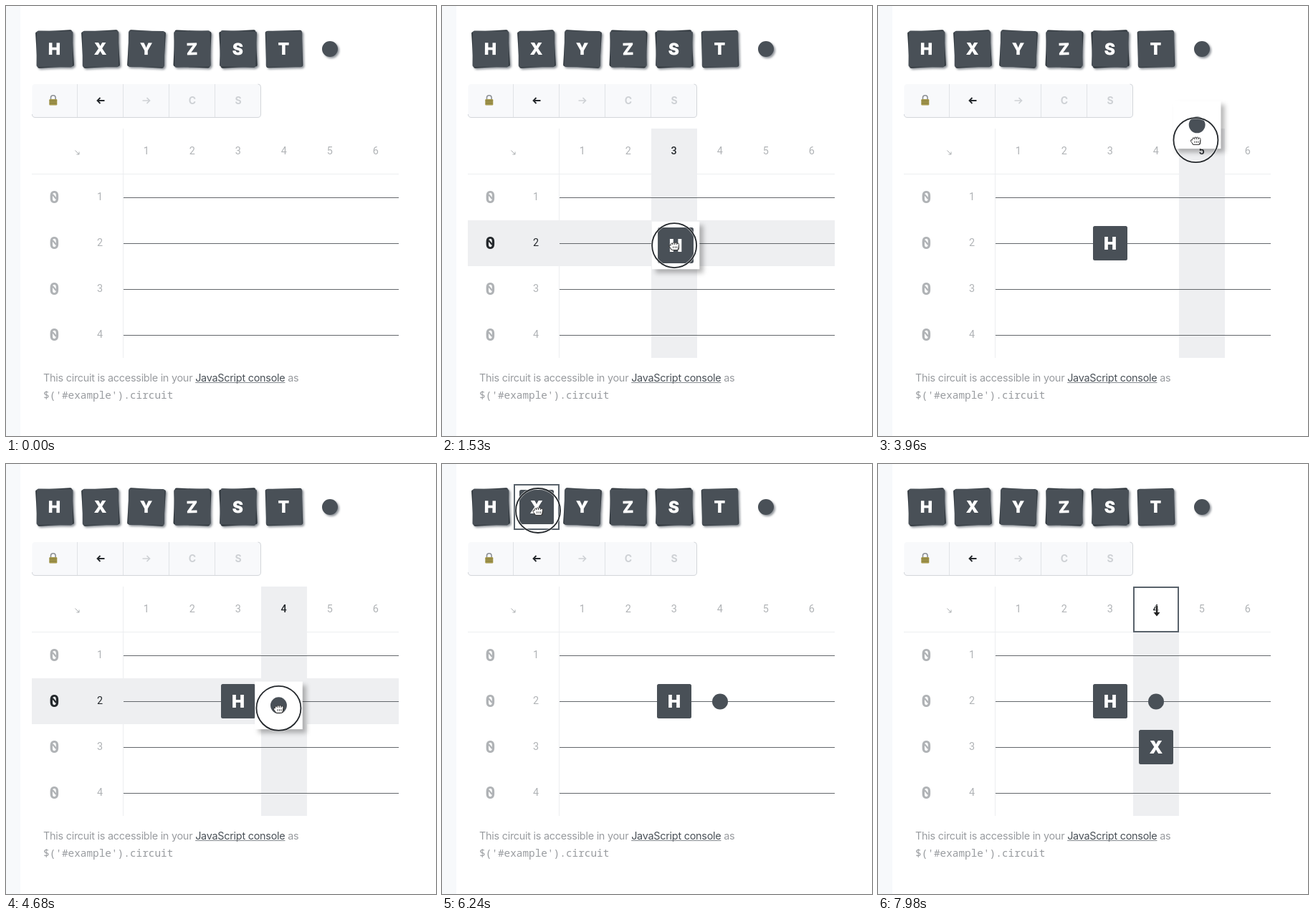
Animation, 600 px wide and 600 px high, one loop 8 s. Source, as an HTML page:

```html
<!DOCTYPE html>
<html lang="en">
<head>
<meta charset="utf-8">
<title>Circuit editor</title>
<style>
html, body { margin: 0; width: 100%; height: 100%; overflow: hidden; background: #fff; }
svg { display: block; width: 100vw; height: 100vh; }
text { font-family: Inter, sans-serif; }
.mid { text-anchor: middle; }
.num { font: 14.4px Roboto, sans-serif; text-anchor: middle; }
.bit { font: bold 24px Roboto, sans-serif; text-anchor: middle; }
.gate { font-weight: 900; fill: #fff; text-anchor: middle; }
.tool { font-size: 14px; font-weight: 700; fill: #ced1d5; text-anchor: middle; }
.note { font-size: 14.4px; letter-spacing: -.017em; fill: #989b9f; }
.mono { font: 14.4px "Noto Sans Mono", monospace; fill: #989b9f; }
.shade { filter: drop-shadow(2px 2px 1.5px rgba(50, 58, 70, .55)); }
.lift { filter: drop-shadow(5px 5px 3px rgba(0, 0, 0, .28)); }
</style>
</head>
<body>
<svg id="stage" viewBox="0 0 600 600"></svg>
<script>
const stage = document.getElementById('stage');
const LOOP = 8000, CELL = 64, LAG = 25;
const INK = '#495057', DARK = '#24282c', PALE = '#b0b3b6';
const colX = i => 164 + CELL * i;
const rowY = i => 235 + CELL * i;
const slotX = i => 68 + CELL * i;

// Letter, tilt of the front tile, tilt of the tile behind it; the last is the control dot
const stacks = [
  ['H', 0.5, -3.5], ['X', 0, -3.5], ['Y', 0.5, 3.5],
  ['Z', -1.5, 2.5], ['S', 2, -3], ['T', 0, -2], ['']
];

// Pointer path: time, x, y
const path = [
  [0, 190, -30], [100, 190, -30], [600, 66, 60], [840, 66, 60],
  [1110, 206, 229], [1500, 324, 334], [2460, 326, 335], [2580, 342, 269],
  [3100, 452, 64], [3780, 452, 64], [3960, 443.5, 186.5], [4080, 428, 250],
  [4350, 381, 340], [4900, 380, 341], [5600, 134, 65], [6400, 134, 65],
  [6510, 150, 100], [7000, 388, 402], [7340, 388, 402], [7860, 389, 205],
  [LOOP, 389, 205]
];

// Each gate is pressed, dragged from its slot and dropped in a cell
const moves = [
  { gate: 'H', slot: 0, press: 700, drag: 840, drop: 1800, col: 2, row: 1 },
  { gate: '', slot: 6, press: 3500, drag: 3780, drop: 4860, col: 3, row: 1 },
  { gate: 'X', slot: 1, press: 6050, drag: 6400, drop: 7200, col: 3, row: 2 }
];

const rect = (x, y, w, h, fill, more = '') =>
  `<rect x="${x}" y="${y}" width="${w}" height="${h}" fill="${fill}" ${more}/>`;
const line = (d, color, w = 1) =>
  `<path d="${d}" fill="none" stroke="${color}" stroke-width="${w}"/>`;
const label = (x, y, s, cls, more = '') =>
  `<text x="${x}" y="${y}" class="${cls}" ${more}>${s}</text>`;
const group = (id, body, more = '') => `<g id="${id}" ${more}>${body}</g>`;
const list = (n, fn) => Array.from({ length: n }, (_, i) => fn(i)).join('');
const block = (size, fill, turn = 0) =>
  rect(-size / 2, -size / 2, size, size, fill, `rx="2.5" transform="rotate(${turn})"`);

function gate(name) {
  return name
    ? block(48, INK) + label(0, 8.7, name, 'gate', 'font-size="24"')
    : `<circle r="11" fill="${INK}"/>`;
}

function stack([name, front, back], i) {
  const body = name
    ? block(51, '#2f363c', back) + block(50.5, INK, front) +
      label(-0.5, 8.2, name, 'gate', `font-size="23" transform="rotate(${front})"`)
    : gate('');
  return group('stack' + i, body, `class="shade" transform="translate(${slotX(i)} 60)"`);
}

function toolbar() {
  return rect(36.5, 109, 319, 46.5, '#f8f9fb', 'rx="4"') +
    line('M36.5 151q0 4.5 4.5 4.5H351q4.5 0 4.5-4.5V113q0-4-4-4', '#d3d6da') +
    list(4, i => line(`M${99.5 + CELL * i} 109V155`, '#e0e3e6')) +
    line('M62.5 131V128a3.3 3.3 0 0 1 6.6 0V131', '#8d9196', 1.6) +
    rect(60.3, 130, 11, 8.5, '#a3964a', 'rx="1.2"') +
    line('M60.8 132.5H70.8M60.8 135.5H70.8', '#7f783c', .8) +
    line('M137.5 132H127.5M131.5 128L127.5 132L131.5 136', DARK, 1.8) +
    line('M190.5 132H200.5M196.5 128L200.5 132L196.5 136', '#ced1d5', 1.7) +
    label(260, 137, 'C', 'tool') + label(324, 137, 'S', 'tool');
}

function grid() {
  return line('M163.5 171V491M36 234.5H548', '#eceef0') +
    line('M96.5 201.5L102 207M98.5 207H102V203.5', '#a2a5a9', .9) +
    rect(0, 171, CELL, 320, '#eeeff1', 'id="colBand"') +
    rect(36, 0, 512, CELL, '#eeeff1', 'id="rowBand"') +
    list(4, i => line(`M164 ${rowY(i) + 32.5}H548`, '#63676b'));
}

function labels() {
  return list(6, i => label(colX(i) + 31.7, 207, i + 1, 'num', `id="col${i}"`)) +
    list(4, i => group('row' + i,
      label(67.5, rowY(i) + 39.5, 0, 'bit') +
      `<path d="M65 ${rowY(i) + 28}l5 6" stroke="currentColor" stroke-width="2.2"/>` +
      label(131, rowY(i) + 36, i + 1, 'num'), 'fill="currentColor"'));
}

function hand(closed) {
  const top = closed ? -4 : -8;
  const fingers = list(4, i =>
    rect(-4.8 + i * 2.8, top + (i % 3 ? 0 : 1), 2.8, 9, '#fff', 'rx="1.4" stroke="#222" stroke-width=".9"'));
  return fingers +
    '<path d="M-4.8 0L-6.5-.4Q-7.6.8-6.4 2.4L-3.4 6.4H4.6Q6.4 4 6.4-.5" fill="#fff" stroke="#222" stroke-width=".9"/>' +
    line('M-1.4 1V4M1.2 1V4M3.6 1V4', '#222', .8) +
    rect(-4, -1, 9.6, 2.2, '#fff');
}

stage.innerHTML =
  rect(0, 0, 600, 600, '#fff') + rect(0, 0, 20, 600, '#f7f9fb') +
  toolbar() + grid() +
  stacks.map(stack).join('') +
  group('box', rect(-31, -31, 62, 62, '#fff', 'stroke="#59626b" stroke-width="2"')) +
  labels() +
  stacks.map(([name], i) => group('flat' + i, gate(name), `transform="translate(${slotX(i)} 60)"`)).join('') +
  label(52, 524, `This circuit is accessible in your <tspan fill="${INK}">JavaScript console</tspan> as`, 'note', 'id="note"') +
  group('under', '') +
  label(52, 548, "$('#example').circuit", 'mono') +
  moves.map((m, i) => group('placed' + i, gate(m.gate),
    `transform="translate(${colX(m.col) + 32} ${rowY(m.row) + 32 + (m.gate ? 0 : .5)})"`)).join('') +
  group('tip', rect(299.5, 347.5, 68, 19, '#e0e4e6', 'rx="1.5" stroke="#c6cacd" style="filter:drop-shadow(0 1px 2px rgba(0,0,0,.25))"') +
    label(333.3, 361, 'Hadamard', 'mid', 'font-size="11" fill="#303438"')) +
  moves.map((m, i) => group('drag' + i,
    `<g class="lift">${rect(-32, -32, 64, 64, '#fff')}</g>` + gate(m.gate))).join('') +
  group('ring', '<circle r="31" fill="none" stroke="#fff" stroke-opacity=".6" stroke-width="3.4"/>' +
    `<circle r="31" fill="none" stroke="${DARK}" stroke-width="1.8"/>`) +
  group('fist', hand(true)) + group('palm', hand(false)) +
  group('down', '<path d="M-1.3-7H1.3V2H4.5L0 7.5L-4.5 2H-1.3Z" fill="#222" stroke="#fff" stroke-width="1" paint-order="stroke"/>') +
  group('arrow', '<path d="M0 0V15.2L3.5 12L6 17.8L8.6 16.7L6.1 11H10.8Z" fill="#111" stroke="#fff" stroke-width="1.2" style="filter:drop-shadow(0 1px 1px rgba(0,0,0,.3))"/>');

const el = id => document.getElementById(id);
const show = (id, on) => { el(id).style.display = on ? '' : 'none'; };
const put = (id, x, y, more = '') => el(id).setAttribute('transform', `translate(${x} ${y})${more}`);

// The link underline follows the rendered text
const note = el('note');
function underline() {
  const start = 35, end = start + 'JavaScript console'.length - 1;
  const a = note.getStartPositionOfChar(start).x, b = note.getEndPositionOfChar(end).x;
  el('under').innerHTML = line(`M${a} 525.5H${b}`, '#868b90');
}
underline();

// Slope at a key that never overshoots
function slope(i, k) {
  if (i < 1 || i > path.length - 2) return 0;
  const rate = j => (path[j + 1][k] - path[j][k]) / (path[j + 1][0] - path[j][0]);
  const a = rate(i - 1), b = rate(i);
  return a * b > 0 ? 2 * a * b / (a + b) : 0;
}

function pointer(t) {
  let i = 0;
  while (i < path.length - 2 && t >= path[i + 1][0]) i++;
  const span = path[i + 1][0] - path[i][0];
  const u = Math.max(0, (t - path[i][0]) / span), v = 1 - u;
  return [1, 2].map(k =>
    v * v * (1 + 2 * u) * path[i][k] + u * u * (3 - 2 * u) * path[i + 1][k] +
    span * u * v * (v * slope(i, k) - u * slope(i + 1, k)));
}

function draw(t) {
  const [x, y] = pointer(t);
  const held = moves.find(m => t >= m.press && t < m.drop);
  const dragging = !!held && t >= held.drag;
  const inGrid = x >= 164 && x < 548 && y >= 171 && y < 491;
  const col = inGrid ? Math.floor((x - 164) / CELL) : -1;
  const row = inGrid && y >= 235 ? Math.floor((y - 235) / CELL) : -1;
  const header = inGrid && row < 0 && !dragging;
  const inSlots = y >= 28 && y < 92 && x >= 36 && x < 484;
  const slot = inSlots && !dragging ? Math.floor((x - 36) / CELL) : -1;

  show('colBand', col >= 0);
  show('rowBand', row >= 0);
  if (col >= 0) el('colBand').setAttribute('x', colX(col));
  if (row >= 0) el('rowBand').setAttribute('y', rowY(row));
  stacks.forEach((_, i) => {
    show('stack' + i, i !== slot);
    show('flat' + i, i === slot);
  });
  for (let i = 0; i < 6; i++) {
    el('col' + i).setAttribute('fill', i === col ? DARK : PALE);
    el('col' + i).style.fontWeight = i === col ? 500 : 400;
  }
  for (let i = 0; i < 4; i++) el('row' + i).style.color = i === row ? DARK : PALE;

  show('box', header || slot >= 0);
  if (header) put('box', colX(col) + 32, 203);
  else if (slot >= 0) put('box', slotX(slot), 60);

  moves.forEach((m, i) => {
    const on = dragging && m === held;
    show('placed' + i, t >= m.drop);
    show('drag' + i, on);
    if (!on) return;
    const [gx, gy] = pointer(m.drag), [lx, ly] = pointer(t - LAG);
    put('drag' + i, lx + slotX(m.slot) - gx, ly + 60 - gy, ' scale(1.04)');
  });
  show('tip', t >= 2300 && t < 2670);

  const onGate = slot >= 0 ||
    moves.some(m => t >= m.drop && m.col === col && m.row === row);
  const kind = held ? 'fist' : onGate ? 'palm' : header ? 'down' : 'arrow';
  for (const id of ['fist', 'palm', 'down', 'arrow']) show(id, id === kind);
  put(kind, x, y);
  show('ring', !!held);
  put('ring', x, y);
}

const begin = performance.now();
function tick() {
  draw((performance.now() - begin) % LOOP);
  requestAnimationFrame(tick);
}
draw(0);
tick();
</script>
</body>
</html>
```
